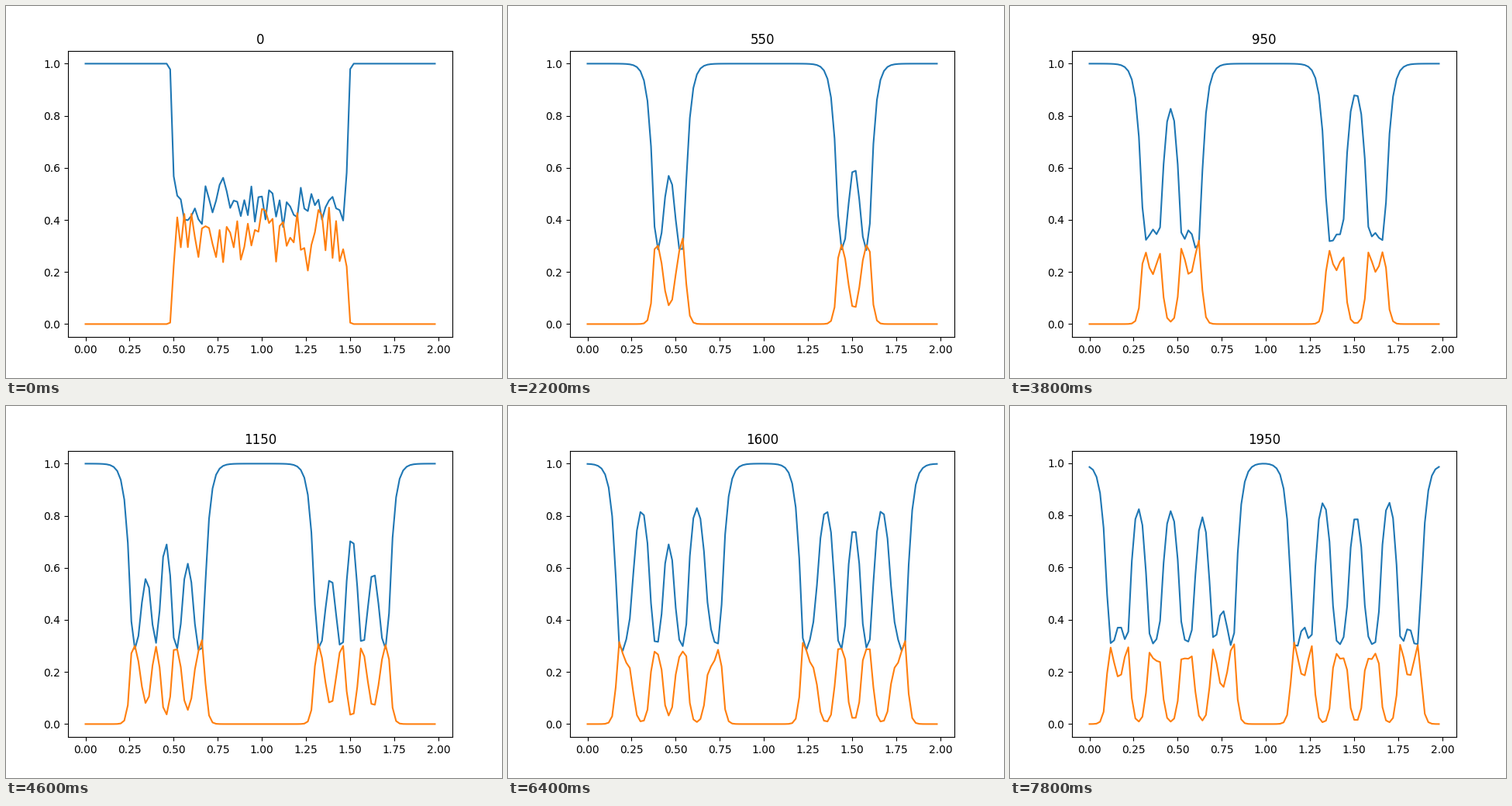
Write a matplotlib script that moves like this. It is 640x480 px and loops after 8000 ms.

```python
"""Gray-Scott reaction-diffusion on a ring, plotted as it self-replicates."""
import numpy as np
import matplotlib.pyplot as plt
from matplotlib.animation import FuncAnimation

N, DX, DT = 100, 0.02, 1.0
DU, DV = 2e-5, 1e-5
FEED, KILL = 0.025, 0.055
FRAMES, STEPS, INTERVAL = 40, 50, 200


def laplacian(a):
    return (np.roll(a, 1) + np.roll(a, -1) - 2 * a) / DX**2


def step(u, v):
    react = u * v * v
    du = DU * laplacian(u) - react + FEED * (1 - u)
    dv = DV * laplacian(v) + react - (FEED + KILL) * v
    return u + DT * du, v + DT * dv


def simulate():
    rng = np.random.default_rng(5)
    u, v = np.ones(N), np.zeros(N)
    # Noisy patch over the middle half of the ring.
    mid = slice(N // 4, 3 * N // 4)
    u[mid] = rng.uniform(0.4, 0.6, N // 2)
    v[mid] = rng.uniform(0.2, 0.4, N // 2)
    states = []
    for i in range((FRAMES - 1) * STEPS + 1):
        u, v = step(u, v)
        if i % STEPS == 0:
            states.append((u, v))
    return states


x = np.arange(N) * DX
states = simulate()
fig, ax = plt.subplots(figsize=(6.4, 4.8), dpi=100)


def draw(i):
    ax.clear()
    for values in states[i]:
        ax.plot(x, values)
    ax.set_title(str(i * STEPS))
    return ax.lines


anim = FuncAnimation(fig, draw, frames=FRAMES, init_func=lambda: draw(0),
                     interval=INTERVAL, repeat=True, repeat_delay=0)
plt.show()
```
